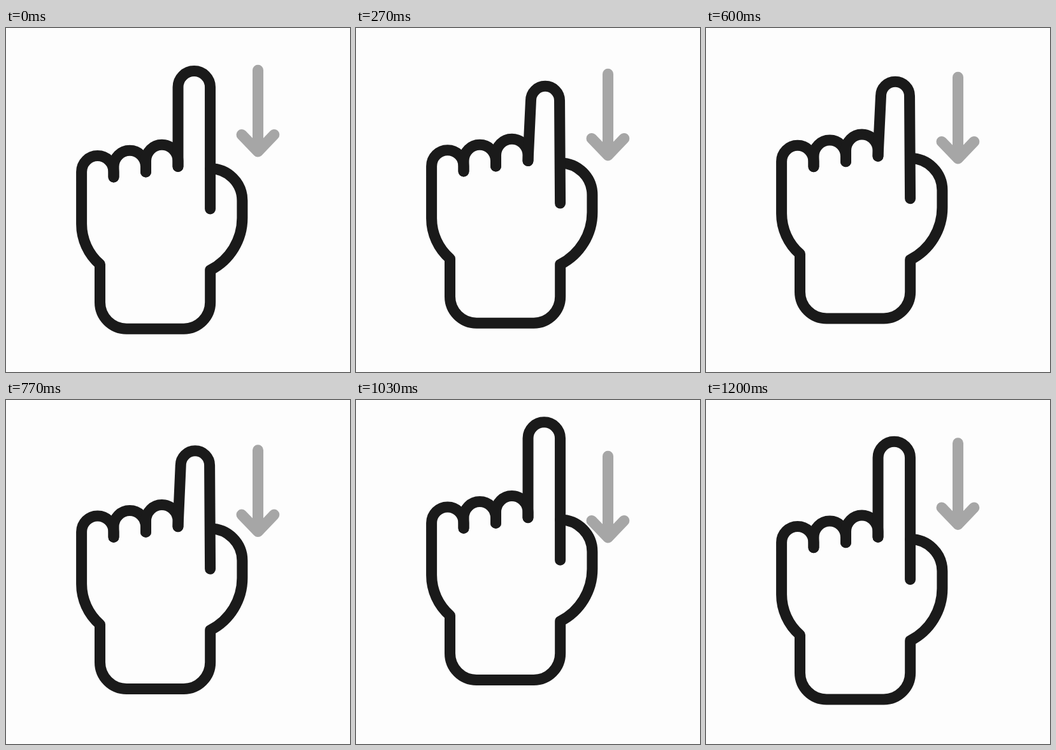
These frames come from a looping animation (540 px wide and 540 px high, 1.23 s). An HTML page:

```html
<!DOCTYPE html>
<html lang="en">
<head>
<meta charset="utf-8">
<title>Swipe down</title>
<style>
  html, body { margin: 0; height: 100%; overflow: hidden; background: #fdfdfd; }
  svg { display: block; width: 100%; height: 100%; }
  path { fill: none; stroke-width: 17; stroke-linecap: round; stroke-linejoin: round; }
  #hand { stroke: #1a1a1a; }
  #arrow { stroke: #a6a6a6; }
</style>
</head>
<body>
<svg viewBox="0 0 540 540">
  <path id="arrow" d="M395.5 66.3V194M370 167.5L395.5 194L420.8 167.5"/>
  <g id="hand">
    <path d="M169 234V225.8A25.2 25.2 0 0 0 118.6 225.8V307
             A84 84 0 0 0 147.5 371V430.5A41.7 41.7 0 0 0 189.2 472.2H279
             A41.7 41.7 0 0 0 320.7 430.5V380
             A92 92 0 0 0 370.9 298V271A50.2 50.2 0 0 0 320.7 220.8"/>
    <path d="M169 234V217.5A25.25 25.25 0 0 1 219.5 217.5V226"/>
    <path d="M219.5 226V208.5A25.25 25.25 0 0 1 270 208.5V217.5"/>
    <path id="finger"/>
  </g>
</svg>
<script>
  const LOOP = 1230, STEP = 1000 / 30;
  const hand = document.getElementById('hand');
  const arrow = document.getElementById('arrow');
  const finger = document.getElementById('finger');

  // Phase ends, counted in steps
  const PRESSED = 8.5, RELEASE = 21.5, TOP = 31, END = 37;
  const MID = 17.8, PEAK = 32.7, BEND = 33;

  const ease = (n, from, to) => {
    const p = Math.min(1, Math.max(0, (n - from) / (to - from)));
    return (1 - Math.cos(Math.PI * p)) / 2;
  };

  function lift(n) {
    if (n < RELEASE) {
      const p = n / RELEASE;
      return MID * p * (1.55 - 0.55 * p);
    }
    if (n < TOP) return MID + (PEAK - MID) * ease(n, RELEASE, TOP);
    return PEAK * (1 - ease(n, TOP, END));
  }

  const bend = n => BEND * (ease(n, 0, PRESSED) - ease(n, RELEASE, TOP));

  function fingerPath(d) {
    const r = 25.25 - d * 0.083;
    const cx = 295.3 + d * 0.052;
    const y = 67.5 + d + r;
    return `M270 217.5L${cx - r} ${y}A${r} ${r} 0 0 1 ${cx + r} ${y}L320.6 284`;
  }

  function draw(n) {
    const up = lift(n);
    hand.setAttribute('transform', `translate(0 ${-up})`);
    arrow.setAttribute('transform', `translate(0 ${up * 0.67})`);
    finger.setAttribute('d', fingerPath(bend(n)));
  }

  const start = performance.now();
  function tick() {
    const t = (performance.now() - start) % LOOP;
    draw(Math.floor((t + 3.4) / STEP));
    requestAnimationFrame(tick);
  }
  tick();
</script>
</body>
</html>
```
